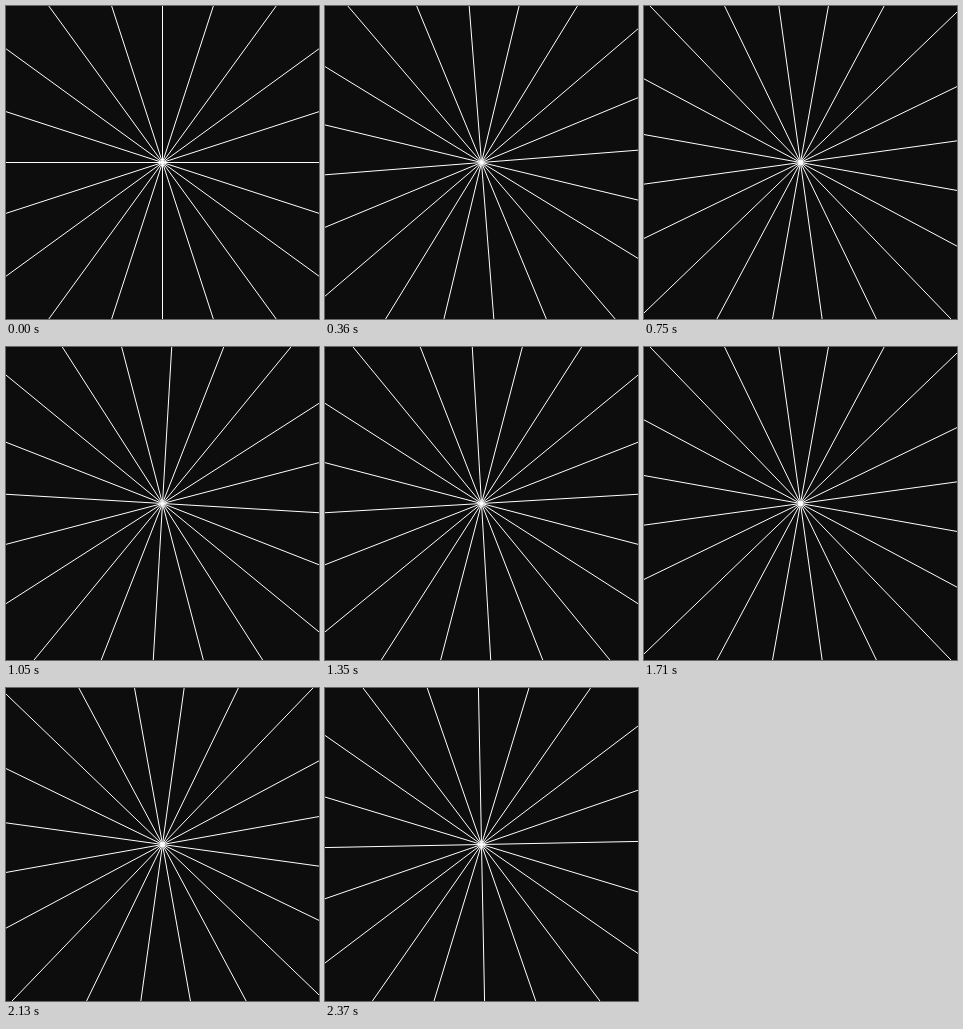
Write an HTML page that moves like this. It is 313 px wide and 313 px high and loops after 2.4 s.

```html
<!DOCTYPE html>
<html lang="en">
<head>
<meta charset="utf-8">
<title>Turning rays</title>
<style>
  html, body { margin: 0; width: 100%; height: 100%; overflow: hidden; background: #0d0d0d; }
  svg { display: block; width: 100vw; height: 100vh; }
</style>
</head>
<body>
<svg viewBox="0 0 313 313">
  <rect width="313" height="313" fill="#0d0d0d"/>
  <path id="rays" fill="none" stroke="#fff" stroke-width="1"/>
</svg>
<script>
  const LOOP = 2400, STEP = 30, TURN = 90;
  const LINES = 10, CENTER = 156.5, REACH = 240;
  const rays = document.getElementById('rays');

  // Each line crosses the center, giving two opposite rays.
  function line(deg) {
    const a = deg * Math.PI / 180;
    const x = REACH * Math.sin(a), y = REACH * Math.cos(a);
    return `M${(CENTER - x).toFixed(3)} ${(CENTER + y).toFixed(3)}` +
           `L${(CENTER + x).toFixed(3)} ${(CENTER - y).toFixed(3)}`;
  }

  function draw(ms) {
    const tick = Math.floor(((ms + 0.5) % LOOP) / STEP);
    const turn = TURN * tick * STEP / LOOP;
    let d = '';
    for (let i = 0; i < LINES; i++) d += line(turn + i * 180 / LINES);
    rays.setAttribute('d', d);
  }

  function frame() {
    draw(performance.now());
    requestAnimationFrame(frame);
  }

  draw(0);
  requestAnimationFrame(frame);
</script>
</body>
</html>
```
